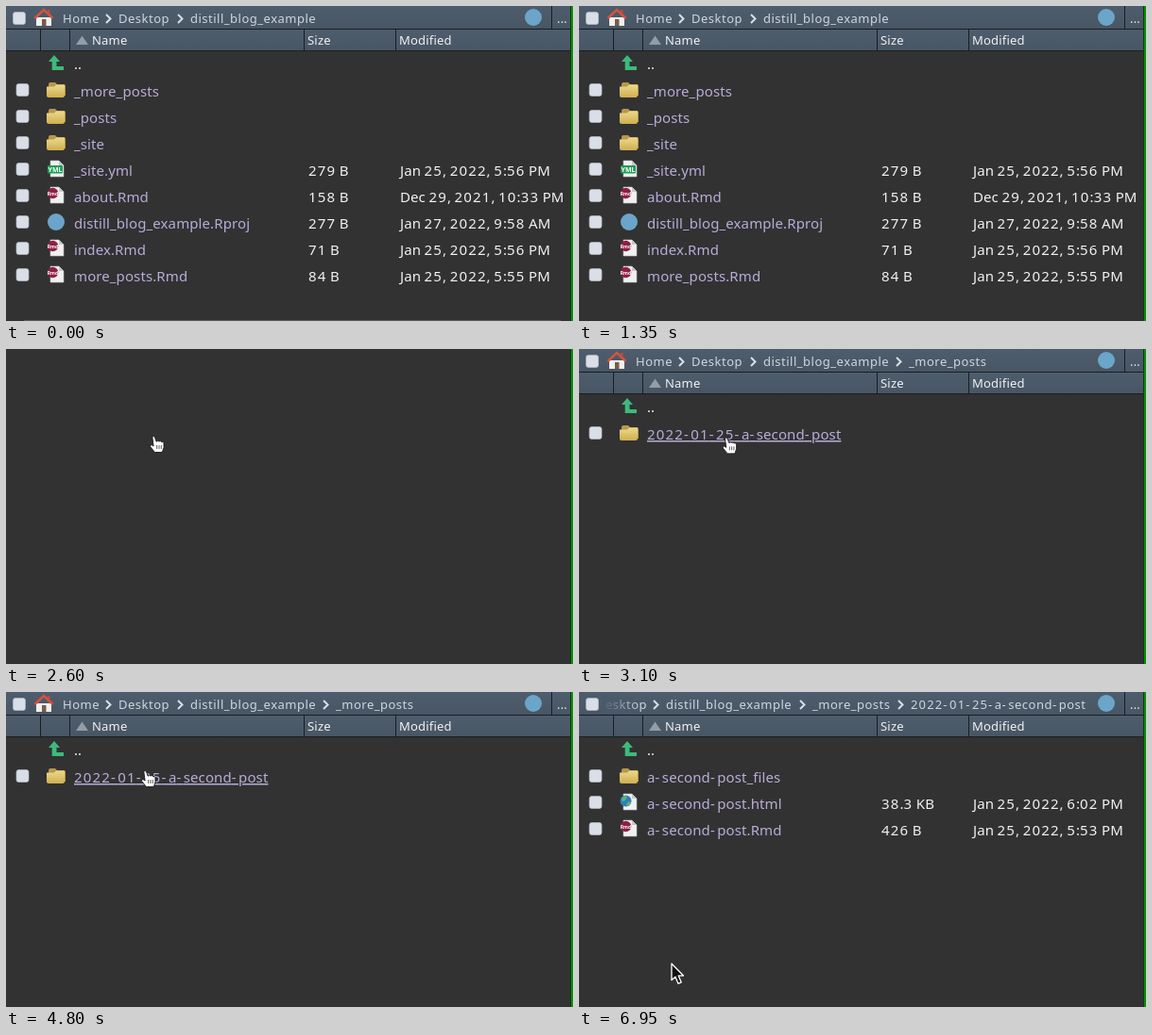
An HTML page for the animation above (7000 ms loop, 600 by 334 pixels).

```html
<!DOCTYPE html>
<html lang="en">
<head>
<meta charset="utf-8">
<title>File browser</title>
<style>
html, body { margin: 0; width: 100%; height: 100%; overflow: hidden; background: #323232; }
svg { display: block; width: 600px; height: 334px; }
text { font: 15px "Noto Sans", "Open Sans", sans-serif; letter-spacing: .1px; white-space: pre; }
.name { fill: #b9acd8; }
.cell { fill: #f2f2f2; word-spacing: -.5px; }
.head { font-size: 13px; font-weight: 500; letter-spacing: .2px; fill: #f0f2f4; }
.crumb { font-size: 13px; letter-spacing: .5px; fill: #cfd7df; }
.digits { letter-spacing: 1.15px; }
.dash { letter-spacing: 2.5px; }
.tiny { font-size: 7px; font-weight: 700; letter-spacing: 0; fill: #fff; text-anchor: middle; }
</style>
</head>
<body>
<svg id="stage" viewBox="0 0 600 334">
  <defs>
    <linearGradient id="bar" x2="0" y2="1">
      <stop stop-color="#4e5d6d"/><stop offset="1" stop-color="#485664"/>
    </linearGradient>
    <linearGradient id="gold" x2="0" y2="1">
      <stop stop-color="#ecd98c"/><stop offset="1" stop-color="#cfae50"/>
    </linearGradient>
    <linearGradient id="fade">
      <stop stop-color="#4b5a69"/><stop offset="1" stop-color="#4b5a69" stop-opacity="0"/>
    </linearGradient>
  </defs>
  <rect width="600" height="334" fill="#323232"/>
  <g id="pages"></g>
  <path id="edge" d="M19 333.5H587" stroke="#5c5c5c"/>
  <path d="M597.5 0V334" stroke="#0f3a0f"/>
  <path d="M599 0V334" stroke="#039003" stroke-width="2"/>
  <g id="arrow">
    <path d="M0 0V17.5L4 14L7 21.2L10.2 19.8L7.2 12.8H12.5Z" fill="#111" stroke="#fff" stroke-width="1.3" stroke-linejoin="round"/>
  </g>
  <g id="hand">
    <path d="M-1.2 .2Q.3-1.2 1.5 .6L3.2 5.2Q4.6 3.6 6 5Q7.5 3.9 8.6 5.5Q10.4 4.8 11 6.8V11.5L9.3 16.5H1.5L-3.4 10.6Q-4 8.3-1.8 8.7L.1 10Z" fill="#fff" stroke="#161616" stroke-width=".9"/>
    <path d="M3.7 9V13M6 9V13M8.3 9V13" stroke="#333" stroke-width=".8"/>
  </g>
</svg>
<script>
const LOOP = 7000;
const byId = id => document.getElementById(id);

const label = (x, y, cls, str) => {
  const runs = str.replace(/\d+|-/g, run =>
    `<tspan class="${run === "-" ? "dash" : "digits"}">${run}</tspan>`);
  return `<text x="${x}" y="${y}" class="${cls}">${runs}</text>`;
};
const box = (x, y, size) =>
  `<rect x="${x}" y="${y}" width="${size}" height="${size}" rx="2.5" fill="#d9dee7" stroke="#b4bcc8" stroke-width=".7"/>`;
const chevron = x =>
  `<path d="M${x} 9l4.5 4.5l-4.5 4.5" fill="none" stroke="#d8dee5" stroke-width="2"/>`;

const sheet = `<path d="M-6-9H3L8-4V8H-6Z" fill="#f0f0f0" stroke="#bdbdbd" stroke-width=".6"/><path d="M3-9V-4H8Z" fill="#c5c8cc"/>`;
const icons = {
  up: `<path d="M-2-9L-8-2H-4.3V7H8V3H.5V-2H4Z" fill="#3dba7b"/>`,
  folder: `<path d="M-8-6Q-8-8-6-8H-1L1-6H8Q10-6 10-4V6H-8Z" fill="#b8984a"/><path d="M-10-3.5H-2L0-5.5H9V6Q9 8 7 8H-8Q-10 8-10 6Z" fill="url(#gold)"/>`,
  yml: sheet + `<rect x="-9" y="-4" width="16" height="8.5" rx="1" fill="#1f9d55"/><text class="tiny" x="-1" y="3">YML</text>`,
  rmd: sheet + `<circle cx="-3.5" cy="-2.5" r="5.8" fill="#8f1f45"/><text class="tiny" x="-3.5" y="-.5" style="font-size:5px">Rmd</text>`,
  html: sheet + `<circle cx="-3.5" cy="-1.5" r="6" fill="#2c7fc0"/><path d="M-8-4Q-5-8-2-6L-4-2L-7-1ZM-1-1L2 0L0 4L-3 3Z" fill="#62b36b"/>`,
  project: `<circle r="9" fill="#6ba5c9"/>`
};
const icon = (kind, y) => `<g transform="translate(53 ${y})">${icons[kind]}</g>`;

const row = ([kind, name, size = "", date = ""], i) => {
  const y = 89 + 28 * i;
  return box(11, y - 6.5, 13) + icon(kind, y) + label(72, y + 7, "name", name) +
    label(320, y + 7, "cell", size) + label(417, y + 7, "cell", date);
};

const chrome =
  `<rect width="597" height="24" fill="url(#bar)"/><rect y="25" width="597" height="22" fill="url(#bar)"/>
  <path d="M0 24.5H597M0 47.5H597M36.5 25V47M67.5 25V47M315.5 25V47M412.5 25V47M577.5 0V24" stroke="#191d21"/>
  <path d="M74 41L80.5 31.5L87 41Z" fill="#929da7"/>` +
  label(91, 41, "head", "Name") + label(319, 41, "head", "Size") + label(416, 41, "head", "Modified") +
  `<g transform="translate(558 12)">${icons.project}</g>` + label(583, 18, "head", "...") +
  icon("up", 61) + label(72, 67, "cell", "..");

const home = `<path d="M32 12H48V21H32Z" fill="#f1f1ee"/><path d="M38 14H42.5V21H38Z" fill="#7a5a48"/>
  <path d="M30.5 13L40 4L49.5 13" fill="none" stroke="#d5533c" stroke-width="2.6"/><path d="M44 4H46.5V9L44 7Z" fill="#c34b37"/>`;

const crumbs = parts => parts.map(([x, str], i) =>
  (i ? chevron(x - 13) : "") + label(x, 18, "crumb", str)).join("");
const root = [[60, "Home"], [119, "Desktop"], [195, "distill_blog_example"]];

const page = (path, rows) => {
  const g = document.createElementNS("http://www.w3.org/2000/svg", "g");
  g.innerHTML = chrome + path + box(7.5, 6.5, 13) + rows.map(row).join("");
  byId("pages").append(g);
  return { g, names: [...g.querySelectorAll(".name")] };
};

const pages = [
  page(home + crumbs(root), [
    ["folder", "_more_posts"],
    ["folder", "_posts"],
    ["folder", "_site"],
    ["yml", "_site.yml", "279 B", "Jan 25, 2022, 5:56 PM"],
    ["rmd", "about.Rmd", "158 B", "Dec 29, 2021, 10:33 PM"],
    ["project", "distill_blog_example.Rproj", "277 B", "Jan 27, 2022, 9:58 AM"],
    ["rmd", "index.Rmd", "71 B", "Jan 25, 2022, 5:56 PM"],
    ["rmd", "more_posts.Rmd", "84 B", "Jan 25, 2022, 5:55 PM"]
  ]),
  page(home + crumbs([...root, [349, "_more_posts"]]), [
    ["folder", "2022-01-25-a-second-post"]
  ]),
  page(crumbs([[28, "esktop"], [92, "distill_blog_example"], [247, "_more_posts"], [351, "2022-01-25-a-second-post"]]) +
    `<rect x="24" y="3" width="42" height="20" fill="url(#fade)"/>`, [
    ["folder", "a-second-post_files"],
    ["html", "a-second-post.html", "38.3 KB", "Jan 25, 2022, 6:02 PM"],
    ["rmd", "a-second-post.Rmd", "426 B", "Jan 25, 2022, 5:53 PM"]
  ])
];

// Pointer stops: time, x, y
const stops = [
  [1450, 205, 298], [1600, 205, 298], [2250, 156, 93], [3050, 156, 93], [3600, 141, 150],
  [4300, 141, 150], [4700, 147, 84], [5200, 147, 84], [5500, 108, 247], [5900, 98, 288], [LOOP, 98, 288]
];
const pointerAt = t => {
  const i = stops.findIndex(s => s[0] > t);
  if (i < 1) return null;
  const [t0, x0, y0] = stops[i - 1], [t1, x1, y1] = stops[i];
  const u = (t - t0) / (t1 - t0), e = u * u * (3 - 2 * u);
  return [x0 + (x1 - x0) * e, y0 + (y1 - y0) * e];
};

const pageAt = t => t < 2500 ? 0 : t < 2750 ? -1 : t < 5150 ? 1 : 2;

const show = (id, shown) => byId(id).style.display = shown ? "" : "none";
const place = (id, shown, pos) => {
  show(id, shown);
  if (shown) byId(id).setAttribute("transform", `translate(${pos[0]} ${pos[1]})`);
};

function draw(t) {
  const current = pageAt(t), pos = pointerAt(t);
  let hovering = current < 0;
  pages.forEach(({ g, names }, i) => {
    g.style.display = i === current ? "" : "none";
    if (i !== current) return;
    names.forEach((name, k) => {
      const over = pos && Math.abs(pos[1] - 90 - 28 * k) < 9 &&
        pos[0] > 72 && pos[0] < 72 + name.getComputedTextLength();
      name.setAttribute("text-decoration", over ? "underline" : "none");
      hovering ||= over;
    });
  });
  show("edge", t < 400);
  place("hand", pos && hovering, pos);
  place("arrow", pos && !hovering, pos);
}

const start = performance.now();
function tick(now) {
  draw(Math.max(0, now - start) % LOOP);
  requestAnimationFrame(tick);
}
draw(0);
requestAnimationFrame(tick);
</script>
</body>
</html>
```
